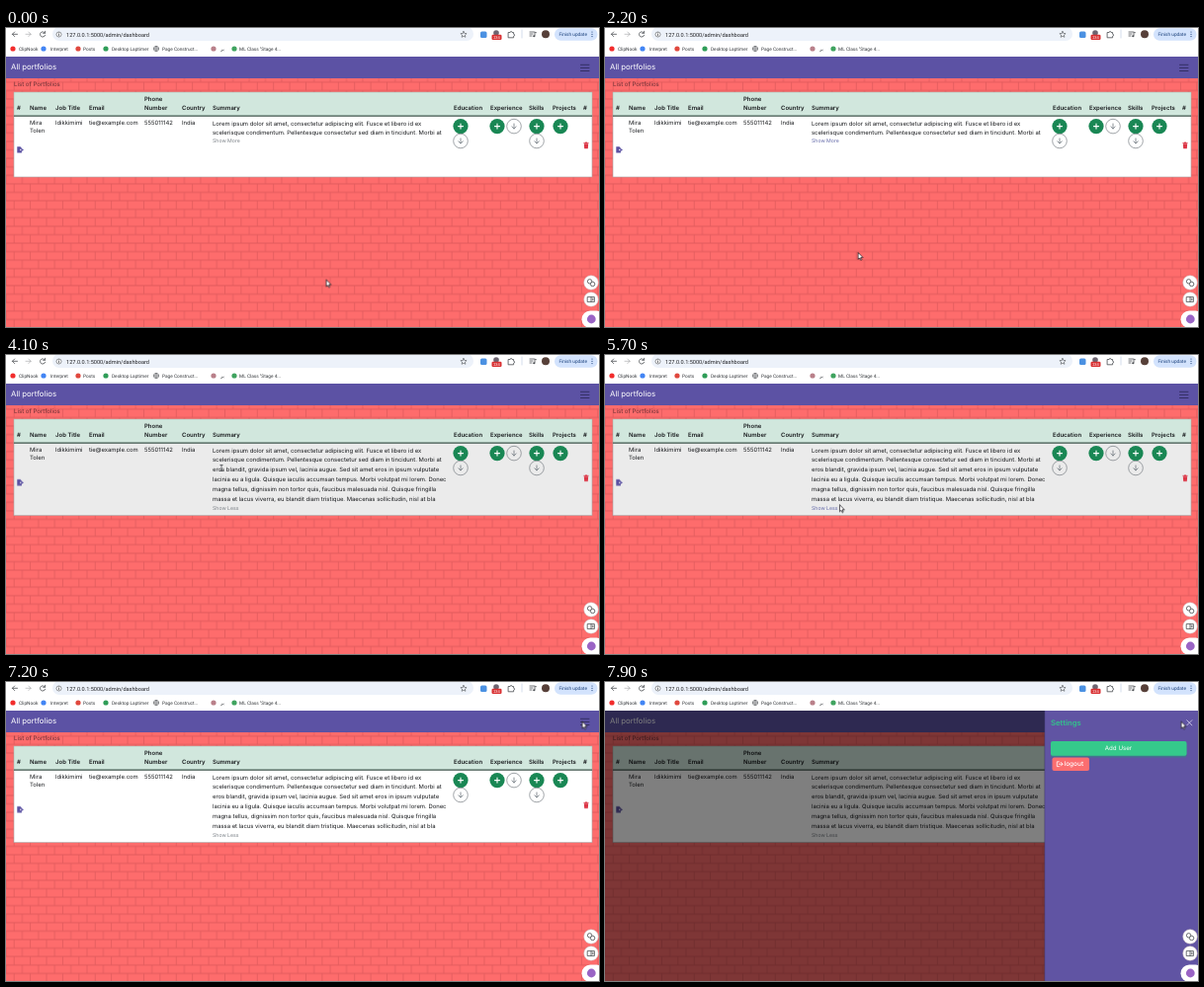
Animation, 600 px wide and 303 px high, one loop 8 s. Source, as an HTML page:

```html
<!DOCTYPE html>
<html lang="en">
<head>
<meta charset="utf-8">
<title>All portfolios</title>
<style>
  html, body { margin: 0; width: 100%; height: 100%; overflow: hidden; background: #fff; }
  svg { display: block; width: 100vw; height: 100vh; }
  text { font-family: Inter, "Open Sans", sans-serif; font-size: 5.9px; fill: #17191c; text-rendering: geometricPrecision; white-space: pre; }
  .chrome text { font-family: Roboto, "Noto Sans", sans-serif; font-size: 4.75px; fill: #33363a; }
  .chrome .address { font-size: 5.6px; fill: #202124; }
  .head text { font-size: 6px; font-weight: 600; }
  .link text { font-size: 5.2px; }
  .line { fill: none; stroke: #4a4d51; stroke-width: .8; stroke-linecap: round; stroke-linejoin: round; }
</style>
</head>
<body>
<svg id="stage" viewBox="0 0 600 303" preserveAspectRatio="none"></svg>
<script>
const LOOP = 8000;
const stage = document.getElementById("stage");

const label = (x, y, str, attrs = "") => `<text x="${x}" y="${y}" ${attrs}>${str}</text>`;
const rect = (x, y, w, h, fill, attrs = "") =>
  `<rect x="${x}" y="${y}" width="${w}" height="${h}" fill="${fill}" ${attrs}/>`;
const dot = (x, y, r, fill, attrs = "") => `<circle cx="${x}" cy="${y}" r="${r}" fill="${fill}" ${attrs}/>`;
const line = (d, attrs = "") => `<path class="line" d="${d}" ${attrs}/>`;

const summary = [
  "Lorem ipsum dolor sit amet, consectetur adipiscing elit. Fusce et libero id ex",
  "scelerisque condimentum. Pellentesque consectetur sed diam in tincidunt. Morbi at",
  "eros blandit, gravida ipsum vel, lacinia augue. Sed sit amet eros in ipsum vulputate",
  "lacinia eu a ligula. Quisque iaculis accumsan tempus. Morbi volutpat mi lorem. Donec",
  "magna tellus, dignissim non tortor quis, faucibus malesuada nisl. Quisque fringilla",
  "massa et lacus viverra, eu blandit diam tristique. Maecenas sollicitudin, nisl at bla"
].map((str, i) => label(209, 98.5 + i * 9.9, str));

const headings = [
  [11, "#"], [24, "Name"], [50, "Job Title"], [84, "Email"], [140, "Number"], [178, "Country"],
  [209, "Summary"], [453, "Education"], [490, "Experience"], [529, "Skills"], [553, "Projects"], [584, "#"]
];
const cells = [
  [24, 98, "Mira"], [24, 106, "Tolen"], [50, 98, "ldikkimimi"],
  [84, 98, "tie@example.com"], [140, 98, "555011142"], [178, 98, "India"]
];
const bookmarks = [
  [7, "#f22c2c", 13, "ClipNook"], [38, "#4285f4", 45, "Interpret"], [73, "#e0483e", 78, "Posts"],
  [101, "#2f9d58", 107, "Desktop Laptimer"], [0, "", 158, "Page Construct..."],
  [210, "#b9808a", 217, "بر"], [231, "#3fa35f", 236, "ML Class \"Stage 4..."]
];

const addButton = (x, y) => dot(x, y, 7.6, "#198754") +
  line(`M${x - 2.5} ${y}h5M${x} ${y - 2.5}v5`, 'style="stroke:#fff;stroke-width:1.1"');
const downArrow = (x, y, color) =>
  line(`M${x} ${y - 2.6}v5M${x - 2.2} ${y + .3}l2.2 2.2 2.2 -2.2`, `style="stroke:${color}"`);
const downButton = (x, y) =>
  dot(x, y, 7.3, "none", 'stroke="#777d83" stroke-width=".7"') + downArrow(x, y, "#6c757d");

const browser = `<g class="chrome">
  ${rect(0, 0, 600, 29, "#fff")}
  ${rect(47, -1, 426, 14, "#edf2fa", 'rx="7"')}
  ${line("M11.5 6.3h-5M8.7 4l-2.3 2.3 2.3 2.3")}
  ${line("M20 6.3h5M22.8 4l2.3 2.3-2.3 2.3", 'opacity=".4"')}
  ${line("M39.3 5A2.6 2.6 0 1 0 39.6 7.3M39.6 3.3v2h-2")}
  ${dot(53.5, 6.5, 2.5, "#fff", 'stroke="#4a4d51" stroke-width=".6"')}${line("M53.5 6.3v1.4M53.5 5v.1")}
  ${label(61, 8.6, "127.0.0.1:5000/admin/dashboard", 'class="address"')}
  ${line("M463 3.4l.9 2 2.2.2-1.7 1.5.5 2.2-1.9-1.2-1.9 1.2.5-2.2-1.7-1.5 2.2-.2z", 'style="stroke-width:.6"')}
  ${rect(480, 3.5, 6.5, 6.5, "#4b91e2", 'rx="1.5"')}
  ${dot(496, 5, 2.8, "#6d6470")}${rect(491.5, 6.8, 10, 5.2, "#d93032", 'rx="1.2"')}
  ${label(496.5, 10.9, "234", 'text-anchor="middle" style="font-size:4px;fill:#fff"')}
  ${line("M508.5 4.5h1.6a1 1 0 0 1 2 0h1.5v1.7a1 1 0 0 1 0 2v1.6h-5.1z")}
  ${line("M522 2v8", 'style="stroke:#c8d4e8"')}
  ${line("M530 4h4.5M530 6h3M530 8h2M535 8.2V4.2l1.5.5")}${dot(534.2, 8.3, 1, "#4a4d51")}
  ${dot(546, 6.3, 4, "#574039")}
  ${rect(555, .3, 43.5, 12.4, "#d3e3fd", 'rx="6.2"')}
  ${label(559.5, 8.2, "Finish update", 'style="fill:#163d78"')}
  ${[4, 6.3, 8.6].map(y => dot(593, y, .6, "#163d78")).join("")}
  ${bookmarks.map(([ix, color, x, str]) => (color && dot(ix, 21, 2.6, color)) + label(x, 22.8, str)).join("")}
  ${line("M149.4 21h5.2M152 18.4q-2.4 2.6 0 5.2q2.4-2.6 0-5.2", 'style="stroke-width:.5"')}
  ${dot(152, 21, 2.6, "none", 'stroke="#4a4d51" stroke-width=".6"')}
</g>`;

const page = `
  ${rect(0, 29, 600, 274, "url(#bricks)")}
  ${rect(0, 29, 600, 22, "#5c52a4")}
  ${label(5, 42.3, "All portfolios", 'style="font-size:7.8px;fill:#fff"')}
  ${line("M581.5 37.3h8.5M581.5 40.4h8.5M581.5 43.5h8.5", 'style="stroke:#292552"')}
  <rect id="focus" x="574.7" y="32.2" width="21.6" height="16.4" rx="2.4" fill="none" stroke="#171235" stroke-width="1.7"/>
  ${label(8, 58.7, "List of Portfolios", 'style="font-size:6.1px;fill:#672f35"')}
  <rect id="row" x="8" y="89" width="585" fill="#fff" stroke="#a9a2a2" stroke-width=".6"/>
  ${rect(8, 65, 585, 24, "#d1e7dd", 'stroke="#9fb5ab" stroke-width=".5"')}
  ${rect(8, 88.6, 585, 1, "#294239")}
  <g class="head">${label(140, 74.3, "Phone")}${headings.map(([x, str]) => label(x, 83, str)).join("")}</g>
  ${cells.map(c => label(...c)).join("")}
  ${summary.slice(0, 2).join("")}
  <g id="more" class="link">${label(209, 115.6, "Show More")}</g>
  <g id="rest">${summary.slice(2).join("")}<g id="less" class="link">${label(209, 157, "Show Less")}</g></g>
  ${[460, 497, 537, 561].map(x => addButton(x, 99.6)).join("")}
  ${downButton(460, 114.5)}${downButton(514, 99.6)}${downButton(537, 114.5)}
  <g id="pressed">${dot(460, 114.5, 7.6, "#6c757d")}${downArrow(460, 114.5, "#fff")}</g>
  <g id="rowIcons">
    <path d="M11.3 120.3h3.2l1.4 1.4v1h-1.7v1.5h1.7v2.2h-4.6zM15.4 121.7l2.6 1.8-2.6 1.8z" fill="#5a50a2"/>
    <path d="M584.8 117.3h4.4l-.4 5h-3.6zM584.4 116.2h1.5l.4-.6h1.4l.4.6h1.5v.8h-5.2z" fill="#dc3545"/>
  </g>
  <rect id="backdrop" y="29" width="600" height="274"/>`;

const panel = `<g id="panel">
  ${rect(445, 29, 155, 274, "#6054a3")}
  ${rect(444.6, 29, .6, 274, "#40386f")}
  ${label(451, 43.8, "Settings", 'style="font-size:7.7px;font-weight:600;fill:#32c48b"')}
  ${line("M588.7 38.7l5.2 5.2M593.9 38.7l-5.2 5.2", 'style="stroke:#d9d5ef"')}
  ${rect(451, 61, 137.5, 15.6, "#3a7f88", 'rx="2" opacity=".7"')}
  ${rect(451, 60, 137.5, 14.8, "#35c98b", 'rx="2"')}
  ${label(519.5, 69.4, "Add User", 'text-anchor="middle" style="font-size:6.2px;fill:#fff"')}
  ${rect(452.5, 76.4, 37.5, 13.6, "#fb6e70", 'rx="2"')}
  ${line("M459.3 80.8h-2v4.8h2M459.3 83.2h3.6M461.3 81.4l1.8 1.8-1.8 1.8", 'style="stroke:#fff"')}
  ${label(464.5, 85.2, "logout", 'style="font-size:6.5px;font-weight:500;fill:#fff"')}
</g>`;

const floats = `
  ${[258, 275].map(y => dot(592, y, 7.3, "#fff", 'stroke="#c9b9bb" stroke-width=".5"')).join("")}
  ${dot(590.6, 256.8, 2.2, "none", 'stroke="#45484c" stroke-width=".8"')}
  ${dot(593.6, 259.5, 2.2, "#fff", 'stroke="#45484c" stroke-width=".8"')}
  ${line("M588.6 272.6h6.8v5h-6.8zM592 272.6v5M593.2 274.2h1M593.2 275.7h1")}
  ${rect(582.5, 286.5, 24, 17.5, "#fff", 'rx="8.7"')}
  ${dot(592.3, 295, 4.4, "#9a64c5")}`;

const cursor = `<g id="cursor">
  <path id="arrow" transform="scale(.72)" d="M0 0V9.8L2.2 7.8 3.7 11 5.2 10.3 3.7 7.2H6.8Z" fill="#fff" stroke="#16131a" stroke-width="1"/>
  <path id="beam" class="line" d="M-1.2 -2.5h2.4M0 -2.5v6M-1.2 3.5h2.4"/>
</g>`;

stage.innerHTML = `<defs>
  <pattern id="bricks" width="42" height="44" patternUnits="userSpaceOnUse" patternTransform="matrix(.3906 0 0 .3906 0 29)">
    <path d="M0 0h42v44H0z" fill="#fe6c6c"/>
    <path fill-rule="evenodd" fill="#e05a5c" d="M0 0h42v44H0zM1 1h40v20H1zM0 23h20v20H0zM22 23h20v20H22z"/>
  </pattern></defs>` + page + panel + browser + floats + cursor;

const start = document.timeline.currentTime || 0;

// Each step is [time, value, easing until the next step].
function play(id, prop, steps, easing = "step-end") {
  const frames = steps.map(([t, value, ease]) => ({ offset: t / LOOP, [prop]: value, easing: ease || easing }));
  frames.push({ offset: 1, [prop]: steps.at(-1)[1] });
  document.getElementById(id).animate(frames, { duration: LOOP, iterations: Infinity }).startTime = start;
}

const EXPAND = 3900, CLICK = 7400, OPEN = 7560;
const GREY = "#7b8187", BLUE = "#6268a8";
const move = (x, y) => `matrix(1, 0, 0, 1, ${x}, ${y})`;

play("cursor", "transform", [
  [0, move(324, 255)], [500, move(324, 255)], [1000, move(330, 310)], [1800, move(300, 310)],
  [2700, move(192, 107)], [3150, move(192, 107)], [3650, move(218, 114)], [4750, move(218, 114)],
  [5300, move(230, 153)], [5650, move(230, 153)], [6050, move(459, 114)], [6380, move(459, 114)],
  [6500, move(488, 93)], [6600, move(488, 93)], [7150, move(583, 40)]
], "ease-in-out");
play("arrow", "opacity", [[0, 1], [3500, 0], [5150, 1]]);
play("beam", "opacity", [[0, 0], [3500, 1], [5150, 0]]);

play("row", "fill", [[0, "#fff"], [2400, "#ebebeb"], [6700, "#fff"]]);
play("row", "height", [[0, "62px"], [EXPAND, "73.7px"]]);
play("rowIcons", "transform", [[0, move(0, 0)], [EXPAND, move(0, 5.8)]]);
play("more", "opacity", [[0, 1], [EXPAND, 0]]);
play("rest", "opacity", [[0, 0], [EXPAND, 1]]);
for (const [id, steps] of [
  ["more", [[0, GREY], [700, BLUE]]],
  ["less", [[0, GREY], [5000, BLUE], [7000, GREY]]]
]) {
  const text = document.querySelector(`#${id} text`);
  text.id = id + "Text";
  play(text.id, "fill", steps);
}

play("pressed", "opacity", [[0, 0], [5980, 0], [6130, 1], [6420, 1], [6570, 0]], "linear");
play("focus", "opacity", [[0, 0], [CLICK, 1]]);
play("backdrop", "opacity", [[0, 0], [OPEN, 0], [OPEN + 150, .5]], "linear");
play("panel", "transform", [[0, move(156, 0)], [OPEN, move(156, 0), "ease-in-out"], [OPEN + 300, move(0, 0)]]);
</script>
</body>
</html>
```
